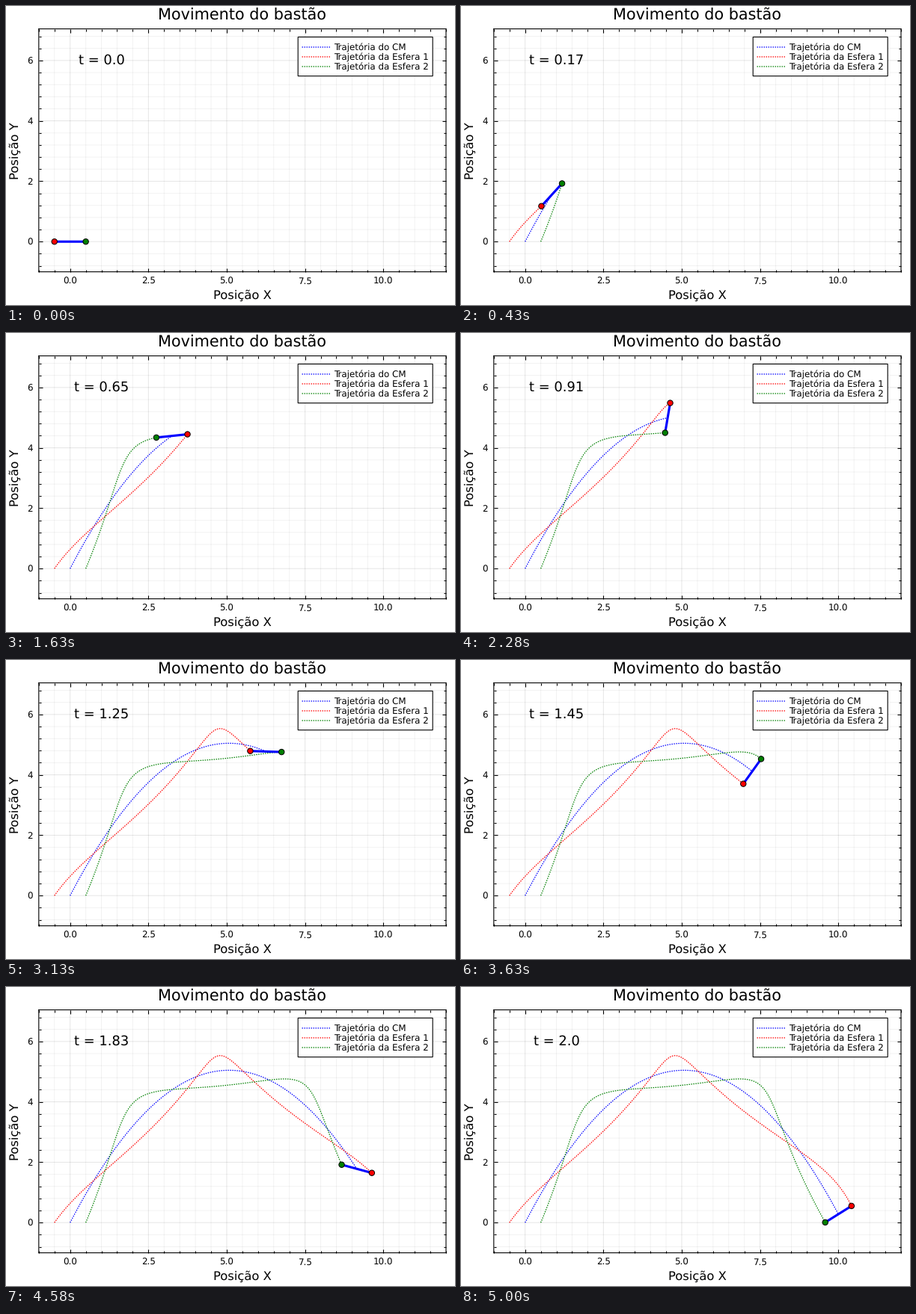
A matplotlib script that plays this animation: 600 px wide and 400 px high, repeating every 5.02 s.

```python
import matplotlib.pyplot as plt
import numpy as np
from matplotlib.animation import FuncAnimation
from matplotlib.lines import Line2D
from matplotlib.patches import Rectangle
from matplotlib.ticker import FormatStrFormatter, MultipleLocator

W, H, DPI = 600, 400, 100
PX = 72 / DPI  # points per pixel
STEPS, LOOP = 201, 5020

plt.rcParams.update({
    "font.family": "DejaVu Sans",
    "text.hinting": "none",
    "path.simplify": False,
    "path.snap": False,
    "toolbar": "None",
})

# Motion: projectile centre of mass plus uniform rotation
G, VX, VY, OMEGA, HALF = 9.81, 5.0, 9.95, 5.0, 0.5
time = np.linspace(0, 2, STEPS)
cm = np.column_stack([VX * time, VY * time - G * time**2 / 2])
arm = HALF * np.column_stack([np.cos(OMEGA * time), np.sin(OMEGA * time)])
ball1, ball2 = cm - arm, cm + arm

fig = plt.figure(figsize=(W / DPI, H / DPI), dpi=DPI, facecolor="white")


def label(x, y, text, size, **kw):
    """Text at pixel position (x, baseline y), measured from the top left."""
    return fig.text(x / W, 1 - y / H, text, fontsize=size * PX,
                    va="baseline", **kw)


def dotted(color):
    return dict(color=color, lw=1.25 * PX, ls=(0, (1.2, 1.2)))


# Axes
LEFT, BOTTOM, WIDTH, HEIGHT = 43.8, 355.6, 544.2, 325
ax = fig.add_axes([LEFT / W, 1 - BOTTOM / H, WIDTH / W, HEIGHT / H])
ax.set_xlim(-1, 12)
ax.set_ylim(-1, VY**2 / (2 * G) + 2)
ax.set_axisbelow(True)
for axis, major, minor, fmt in ((ax.xaxis, 2.5, 0.5, "%.1f"),
                                (ax.yaxis, 2, 0.4, "%d")):
    axis.set_major_locator(MultipleLocator(major))
    axis.set_minor_locator(MultipleLocator(minor))
    axis.set_major_formatter(FormatStrFormatter(fmt))
ax.grid(which="major", color="black", alpha=0.1, lw=PX)
ax.grid(which="minor", color="black", alpha=0.05, lw=PX)
ax.tick_params(which="both", direction="in", top=True, right=True,
               width=1.1 * PX)
ax.tick_params(which="major", length=5.4 * PX, labelbottom=False,
               labelleft=False)
ax.tick_params(which="minor", length=2.7 * PX)
for spine in ax.spines.values():
    spine.set_linewidth(1.1 * PX)

# Labels
SMALL, GUIDE, NOTE, TITLE = 11.87, 16.35, 17.9, 20.8
label(315.7, 18, "Movimento do bastão", TITLE, ha="center")
label(316, 392, "Posição X", GUIDE, ha="center")
label(16.5, 193.5, "Posição Y", GUIDE, ha="center", rotation=90,
      rotation_mode="anchor")
for v in np.arange(0, 12, 2.5):
    label(LEFT + (v + 1) * WIDTH / 13, 372, f"{v:.1f}", SMALL, ha="center")
y_scale = HEIGHT / np.ptp(ax.get_ylim())
for v in range(0, 8, 2):
    label(36, BOTTOM - (v + 1) * y_scale + 4.6, str(v), SMALL, ha="right")
clock = label(128, 77.7, "", NOTE, ha="center")

# Legend
fig.add_artist(Rectangle((390.2 / W, 1 - 93.7 / H), 180 / W, 52.2 / H,
                         transform=fig.transFigure, fc="white", ec="black",
                         lw=1.1 * PX))
entries = (("Trajetória do CM", "blue"), ("Trajetória da Esfera 1", "red"),
           ("Trajetória da Esfera 2", "green"))
for i, (name, color) in enumerate(entries):
    y = 55 + 13 * i
    fig.add_artist(Line2D([395.5 / W, 433.5 / W], [1 - y / H] * 2,
                          transform=fig.transFigure, **dotted(color)))
    label(438.5, y + 4.3, name, SMALL)

# Moving parts
paths = (cm, ball1, ball2)
trails = [ax.plot([], [], **dotted(color))[0] for _, color in entries]
rod, = ax.plot([], [], color="blue", lw=3.1 * PX, solid_capstyle="butt",
               zorder=3)
balls = ax.scatter([0, 0], [0, 0], s=(7.4 * PX)**2, c=["red", "green"],
                   edgecolors="black", linewidths=PX, zorder=4)


def update(k):
    for trail, path in zip(trails, paths):
        trail.set_data(*path[:k + 1].T)
    ends = np.array([ball1[k], ball2[k]])
    rod.set_data(*ends.T)
    balls.set_offsets(ends)
    clock.set_text(f"t = {round(k / 100, 2)}")
    return [*trails, rod, balls, clock]


anim = FuncAnimation(fig, update, frames=STEPS, interval=LOOP / STEPS,
                     repeat=True, repeat_delay=0, blit=False)
plt.show()
```
